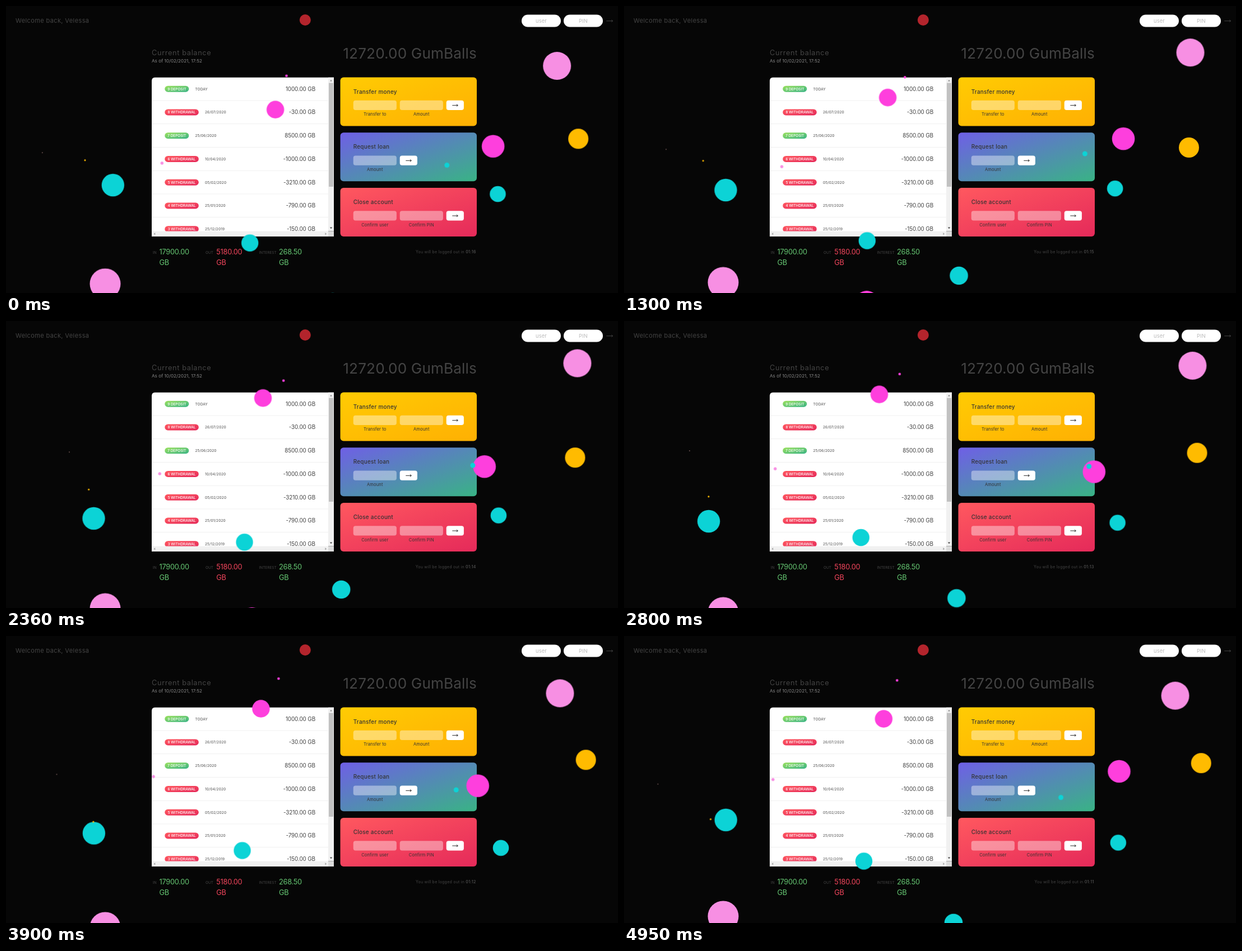
Write an HTML page that moves like this. It is 1092 px wide and 513 px high and loops after 4990 ms.

```html
<!DOCTYPE html>
<html lang="en">
<head>
<meta charset="utf-8">
<title>Bank dashboard</title>
<style>
  html, body { margin: 0; width: 100%; height: 100%; overflow: hidden; background: #060606; }
  svg { display: block; width: 1092px; height: 513px; font-family: Inter, "Open Sans", sans-serif; }
</style>
</head>
<body>
<svg viewBox="0 0 1092 513">
  <defs id="defs">
    <clipPath id="list"><path d="M260 403V133.5a6 6 0 0 1 6-6H575V403z"/></clipPath>
  </defs>
  <g id="header"></g>
  <g id="rows" clip-path="url(#list)"></g>
  <g id="scrollbars">
    <path fill="#f1f1f1" d="M575 127.5h10v275h-10zM260 402.5h315v9.5H260z"/>
    <path fill="#dcdcdc" d="M575 402.5h10v9.5h-10z"/>
    <path fill="#c1c1c1" d="M576 137.5h8V323h-8z"/>
    <path fill="#8a8a8a" d="M577.8 134.5h4.4l-2.2-2.6z"/>
    <path fill="#444" d="M577.8 395.6h4.4l-2.2 2.6z"/>
    <path fill="#a3a3a3" d="M266.2 405v4.4l-2.6-2.2zM569.4 405v4.4l2.6-2.2z"/>
  </g>
  <g id="cards"></g>
  <g id="footer"></g>
  <g id="bubbles"></g>
</svg>
<script>
const LOOP = 4990;
const HEAD_START = 150000; // all bubbles set off together this long before the loop
const $ = id => document.getElementById(id);

function add(parent, tag, attrs, content = "") {
  const el = document.createElementNS("http://www.w3.org/2000/svg", tag);
  for (const key in attrs) el.setAttribute(key, attrs[key]);
  el.textContent = content;
  return parent.appendChild(el);
}

function text(parent, x, y, size, fill, content, { weight = 400, anchor = "start", space = 0 } = {}) {
  return add(parent, "text", {
    x, y, fill, "font-size": size, "font-weight": weight,
    "text-anchor": anchor, "letter-spacing": space + "em"
  }, content);
}

const box = (parent, x, y, width, height, rx, fill) =>
  add(parent, "rect", { x, y, width, height, rx, fill });

const arrow = (parent, x, y, w, stroke) =>
  add(parent, "path", {
    d: `M${x - w / 2} ${y}h${w}m-2.4 -1.9l2.4 1.9l-2.4 1.9`,
    fill: "none", stroke, "stroke-width": .95
  });

function gradient(id, from, to) {
  const el = add($("defs"), "linearGradient", { id, x2: 1, y2: 1 });
  add(el, "stop", { "stop-color": from });
  add(el, "stop", { "stop-color": to, offset: 1 });
}

function buildHeader(g) {
  text(g, 17, 30.4, 11, "#444", "Welcome back, Velessa", { space: .035 });
  add(g, "circle", { cx: 533.8, cy: 25, r: 10, fill: "#b3242c" });
  ["user", "PIN"].forEach((label, i) => {
    const x = 920 + 75 * i;
    box(g, x, 15.5, 70, 22, 11, "#fff");
    text(g, x + 35, 29.9, 9.3, "#bbb", label, { anchor: "middle", space: .02 });
  });
  arrow(g, 1077, 26.7, 11.5, "#444");
  text(g, 260, 88.3, 12.76, "#444", "Current balance", { space: .05 });
  text(g, 260, 101, 8.1, "#888", "As of 10/02/2021, 17:52", { space: .005 });
  text(g, 840, 93.8, 26.1, "#444", "12720.00 GumBalls", { anchor: "end", space: .006 });
}

function buildRows(g) {
  const moves = {
    "TODAY": 1000, "26/07/2020": -30, "25/06/2020": 8500, "10/04/2020": -1000,
    "05/02/2020": -3210, "25/01/2020": -790, "25/12/2019": -150
  };
  box(g, 260, 127.5, 325, 284.5, 0, "#fff");
  Object.entries(moves).forEach(([date, amount], i) => {
    const y = 148.2 + 41.75 * i;
    const type = amount > 0 ? "deposit" : "withdrawal";
    const width = amount > 0 ? 43 : 60.5;
    box(g, 283.3, y - 5.5, width, 11, 5.5, `url(#${type})`);
    text(g, 283.3 + width / 2, y + 2.3, 6.4, "#fff", `${9 - i} ${type.toUpperCase()}`, { weight: 500, anchor: "middle" });
    text(g, 294.5 + width, y + 2.3, 6.4, "#666", date, { weight: 500, space: .02 });
    text(g, 552, y + 3.5, 9.9, "#444", amount.toFixed(2) + " GB", { anchor: "end", space: -.01 });
    box(g, 260, y + 20.5, 315, .6, 0, "#e6e6e6");
  });
}

function buildCards(g) {
  const cards = [
    ["Transfer money", "transfer", "Transfer to", "Amount"],
    ["Request loan", "loan", "Amount"],
    ["Close account", "withdrawal", "Confirm user", "Confirm PIN"]
  ];
  cards.forEach(([title, fill, ...fields], i) => {
    const y = 127.5 + 98.7 * i;
    const left = 619.7;
    const step = 83;
    box(g, 596.5, y, 243.5, 87, 5.8, `url(#${fill})`);
    text(g, left, y + 29, 9.9, "#333", title, { weight: 500, space: .028 });
    fields.forEach((label, n) => {
      const x = left + step * n;
      box(g, x, y + 41.3, 77.2, 17.2, 4, "rgba(255,255,255,.4)");
      text(g, x + 38.6, y + 68.6, 7.54, "#333", label, { anchor: "middle", space: .02 });
    });
    const x = left + step * fields.length;
    box(g, x, y + 41.3, 31.2, 17.2, 4, "#fff");
    arrow(g, x + 15.6, y + 50.1, 10, "#222");
  });
}

function buildFooter(g) {
  const sum = (x, label, valueX, value, fill) => {
    text(g, x, 443.3, 6.5, "#444", label);
    [value, "GB"].forEach((part, i) =>
      text(g, valueX, 443.6 + 19.1 * i, 12.76, fill, part, { space: -.02 }));
  };
  sum(262, "IN", 273.5, "17900.00", "#66c873");
  sum(356, "OUT", 375.3, "5180.00", "#f5465d");
  sum(451.5, "INTEREST", 487, "268.50", "#66c873");
  const line = text(g, 838.7, 442.4, 7, "#444", "You will be logged out in ", { anchor: "end", space: .035 });
  return add(line, "tspan", { "font-weight": 600, fill: "#4c4c4c" });
}

// A bubble glides between its home and home + drift, back and forth.
function bubble(fill, r, [x, y], [dx, dy], duration) {
  const move = add($("bubbles"), "circle", { r, cx: x, cy: y, fill }).animate(
    { transform: ["translate(0, 0)", `translate(${dx}px, ${dy}px)`] },
    { duration, direction: "alternate", iterations: Infinity, easing: "ease-in-out" }
  );
  move.pause();
  return move;
}

function buildBubbles() {
  const pink = "#f78fe3", magenta = "#fe3fdd", cyan = "#0cd3d6", gold = "#ffbb00", dust = "#b58a86";
  return [
    bubble(pink, 25, [1020, 75], [-38, 33], 2454),
    bubble(pink, 27.5, [177, 491], [0, 33], 2599),
    bubble(pink, 2.7, [282, 288], [-19, -37], 3145),
    bubble(magenta, 20.3, [893, 236], [-60, 37], 2288),
    bubble(magenta, 15.7, [481, 186], [-27, -58], 3742),
    bubble(magenta, 20, [433, 529], [22, 11], 2611),
    bubble(magenta, 2.3, [486, 75], [16, 55], 3506),
    bubble(cyan, 20.2, [192, 319], [-42, 40], 2784),
    bubble(cyan, 16.3, [582, 532], [18, -58], 2201),
    bubble(cyan, 15.2, [436, 426], [-15, -44], 3010),
    bubble(cyan, 14.3, [883, 379], [-7, -54], 3081),
    bubble(cyan, 4.5, [833, 258], [-56, 32], 3172),
    bubble(gold, 18, [1035, 221], [-27, 32], 2752),
    bubble(gold, 1.6, [140, 272], [16, 61], 3586),
    bubble(dust, .8, [117, 232], [-57, 33], 2315)
  ];
}

gradient("deposit", "#9be15d", "#39b385");
gradient("withdrawal", "#ff585f", "#e52a5a");
gradient("transfer", "#ffcb03", "#ffb003");
gradient("loan", "#6f5fe6", "#39b385");
buildHeader($("header"));
buildRows($("rows"));
buildCards($("cards"));
const clock = buildFooter($("footer"));
const bubbles = buildBubbles();
const began = performance.now();

function draw(now) {
  const t = Math.max(0, now - began) % LOOP;
  for (const move of bubbles) move.currentTime = HEAD_START + t;
  clock.textContent = "01:" + (16 - Math.floor((t + 250) / 1000));
  requestAnimationFrame(draw);
}
draw(began);
</script>
</body>
</html>
```
